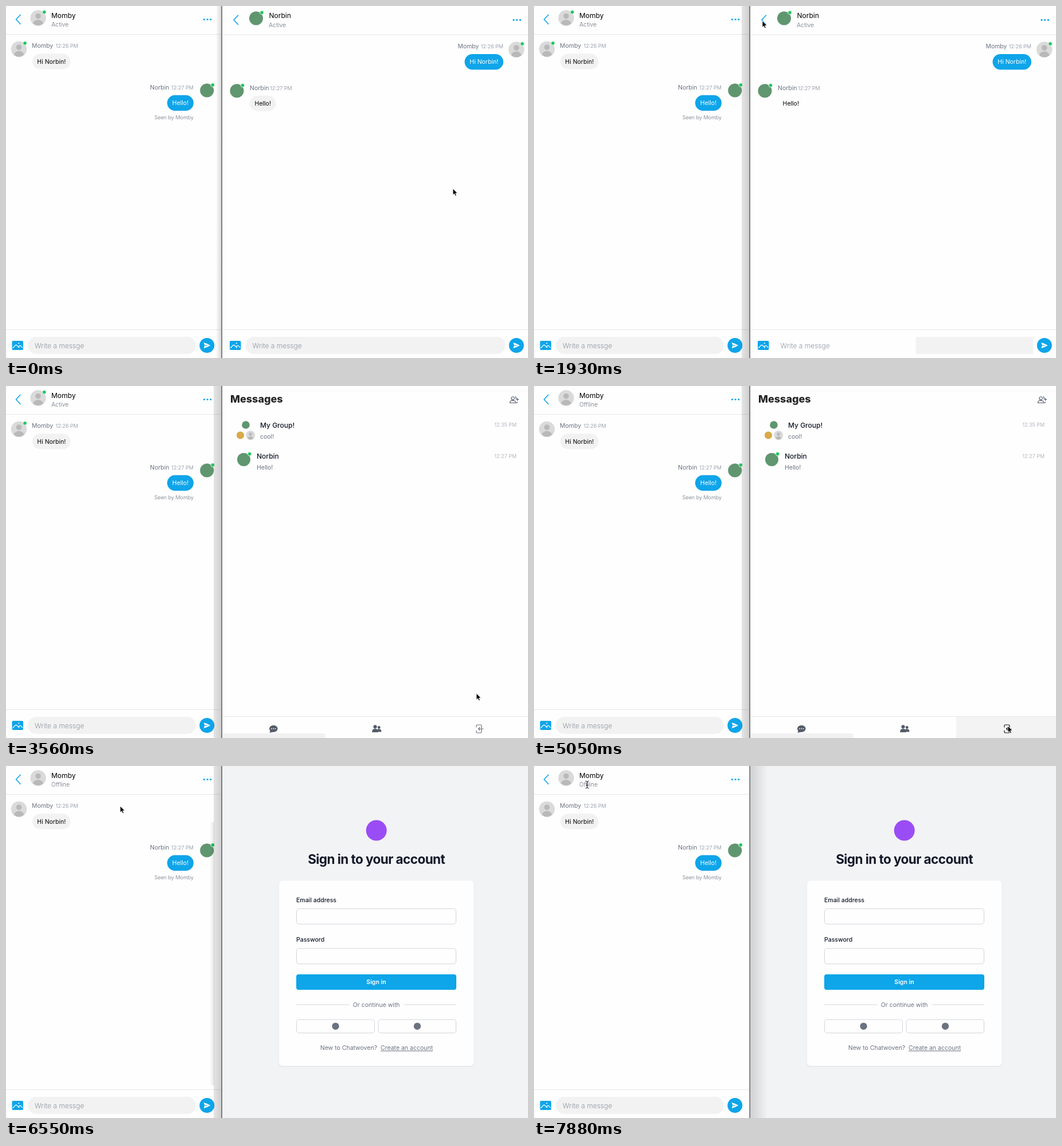
An HTML page for the animation above (8 s loop, 910 by 615 pixels).

```html
<!DOCTYPE html>
<html lang="en">
<head>
<meta charset="utf-8">
<title>Two chat windows</title>
<style>
  html, body { margin: 0; width: 100%; height: 100%; overflow: hidden; background: #fefefe; }
  svg { display: block; width: 100%; height: 100%; font-family: Inter, "Open Sans", sans-serif; }
</style>
</head>
<body>
<svg id="stage" viewBox="0 0 910 615"></svg>
<script>
const BLUE = '#0ea5e9', LINE = '#e4e6ea', PALE = '#f3f3f4', GRAY = '#6b7280', SOFT = '#9ca3af', INK = '#111827';
const GUEST = 'Momby', HOST = 'Norbin';

// Drawing helpers
const text = (x, y, str, size, fill = INK, weight = 400, anchor = 'start', extra = '') =>
  `<text x="${x}" y="${y}" font-size="${size}" fill="${fill}" font-weight="${weight}" text-anchor="${anchor}" ${extra}>${str}</text>`;
const rect = (x, y, w, h, fill, r = 0, extra = '') =>
  `<rect x="${x}" y="${y}" width="${w}" height="${h}" rx="${r}" fill="${fill}" ${extra}/>`;
const circle = (x, y, r, fill, extra = '') => `<circle cx="${x}" cy="${y}" r="${r}" fill="${fill}" ${extra}/>`;
const path = (d, stroke, width = 1, fill = 'none') =>
  `<path d="${d}" fill="${fill}" stroke="${stroke}" stroke-width="${width}" stroke-linecap="round" stroke-linejoin="round"/>`;
const rule = (x, y, w) => rect(x, y, w, 1, LINE);
const group = (id, body, extra = '') => `<g id="${id}" ${extra}>${body}</g>`;
const at = (x, y, body, scale = 1) => `<g transform="translate(${x} ${y}) scale(${scale})">${body}</g>`;

// Avatars
const silhouette = (x, y, r = 13.7) => at(x, y, circle(0, 0, 10, '#dadada') +
  circle(0, -2.4, 3.5, '#b9b9b9') + `<path d="M-6.3 7.2C-6 .8 6 .8 6.3 7.2Q0 12.2-6.3 7.2" fill="#b9b9b9"/>`, r / 10);
const mascot = (x, y, r = 12) => circle(x, y, r, '#5f9670');
const online = (x, y) => circle(x, y, 3.3, '#22c55e', 'stroke="#fff" stroke-width=".8"');

// Chat window parts; (x, y) is the pane's shift
const chatHeader = (x, y, width, name) =>
  path(`M${x + 25} ${15.5 + y}l-7.5 8 7.5 8`, BLUE, 1.6) +
  text(x + 79, 20.5 + y, name, 12, '#000') +
  [0, 5.7, 11.4].map(d => circle(x + width - 30.5 + d, 23.5 + y, 1.6, BLUE)).join('') +
  rule(x, 49 + y, width);

const messageBar = (x, width, id) =>
  rule(x, 565, width) +
  at(x + 10.5, 585, rect(0, 0, 19.5, 16, BLUE, 2) +
    path('M1.5 12.2L6 7.6Q7 6.8 8 7.6l4.4 4.4M11 10.6l2.3-2Q14.2 8 15 8.6l3 3', '#fff', 1.3) + circle(11.8, 4.3, 1.1, '#fff')) +
  group(id, rect(x + 38, 578, width - 82, 30, '#f2f2f2', 15)) +
  text(x + 50, 597.5, 'Write a messge', 12, '#8d94a0', 300) +
  circle(x + width - 24.7, 593, 13, BLUE) +
  at(x + width - 30.3, 588, '<path d="M0 0Q6 1.6 11.5 5 6 8.500 0 10L1.500 5.600H6.500V4.400H1.500Z" fill="#fff"/>');

const bubble = (x, y, w, str, mine, id) =>
  group(id, rect(x, y, w, 27.2, mine ? BLUE : '#f2f2f3', 13.6)) +
  text(x + w / 2, y + 17.4, str, 10.5, mine ? '#fff' : '#000', 400, 'middle');
const received = (x, timeX, y, name, time) =>
  text(x, y, name, 10.5, GRAY) + text(timeX, y, time, 9, SOFT);
const sent = (right, y, name, time) =>
  text(right - 42.5, y, name, 10.5, GRAY, 400, 'end') + text(right, y, time, 9, SOFT, 400, 'end');

const leftPane =
  chatHeader(0, 0, 376, GUEST) + silhouette(56, 21) + silhouette(22.5, 75.5) +
  group('guestActive', text(79, 36.3, 'Active', 10.5, GRAY, 300) + online(66.7, 10.7) + online(33, 65)) +
  group('guestOffline', text(79, 36.3, 'Offline', 10.5, GRAY, 300)) +
  received(45, 86.500, 73, GUEST, '12:26 PM') + bubble(46, 83.3, 66.5, `Hi ${HOST}!`) +
  sent(327, 146, HOST, '12:27 PM') + bubble(281, 155.8, 46, 'Hello!', true) +
  mascot(350.3, 147.5) + online(360.3, 138) +
  text(327, 198.3, `Seen by ${GUEST}`, 9, GRAY, 300, 'end') +
  messageBar(0, 375, 'leftField');

const rightChat =
  chatHeader(379.5, .8, 536, HOST) + text(458, 37, 'Active', 10.5, GRAY, 300) +
  mascot(436, 21.5) + online(446, 11.5) +
  sent(867, 74, GUEST, '12:26 PM') + bubble(799.5, 84, 67.5, `Hi ${HOST}!`, true) +
  silhouette(889.7, 76.3) + online(900, 66) +
  received(425, 460, 146.8, HOST, '12:27 PM') + bubble(425, 156.5, 45.5, 'Hello!', false, 'helloBubble') +
  mascot(402.5, 148.3) + online(412.5, 138.7) +
  messageBar(379.5, 535, 'rightField') + group('fieldRest', rect(665.5, 578, 205, 30, '#f2f2f2', 3));

// Conversation list
const person = (x, y) => circle(x, y - 3.7, 3.1, '#555c69') + `<path d="M${x - 5.4} ${y + 6}q0-6.300 5.400-6.300t5.400 6.300z" fill="#555c69"/>`;
const listPane =
  rect(377, 8.500, 533, 1, '#f7f7f8') +
  text(391, 28.500, 'Messages', 18, '#262626', 800) +
  group('addRing', circle(885.5, 24, 13.3, '#eeeff1')) +
  path('M883.500 18.800a2.700 2.700 0 1 0 .01 0M878.500 29.500v-1q.3-3.200 5-3.200t5 3.200v1zM887.500 18.700q2.500.7 1.700 3.800M889.800 29.500h1.200v-1.500M889.700 23.500h4M891.700 21.500v4', '#4b5563', 1.1) +
  mascot(418, 68, 6.8) + circle(408.5, 86, 6.6, '#d9a94a') + silhouette(426.2, 86, 8) +
  text(443, 72.500, 'My Group!', 12, INK, 500) + text(443, 91.500, 'cool!', 10.5, GRAY) +
  text(890, 71.3, '12:35 PM', 9, SOFT, 300, 'end') +
  mascot(414.5, 128.5, 11.5) + online(424.7, 118.7) +
  text(437, 127, HOST, 12, INK, 500) + text(437, 146, 'Hello!', 10.5, GRAY) +
  text(890, 125.5, '12:27 PM', 9, SOFT, 300, 'end') +
  group('tabFill', rect(377, 578, 179, 29, '#ebecee')) + rect(377, 607, 179, 8, '#f1f1f2') +
  group('exitHover', rect(735.8, 578, 175, 37, PALE)) +
  rule(377, 577, 533) +
  `<ellipse cx="466.300" cy="598.700" rx="7.300" ry="6" fill="#555c69"/><path d="M461 601l-1.500 5 6-1.500z" fill="#555c69"/>` +
  [463, 466.3, 469.6].map(x => circle(x, 598.7, .9, '#fff')).join('') +
  at(650.2, 599.500, person(0, 0), .8) + person(643.5, 599) +
  group('exitIcon', path('M820 596v-2.300q0-1.700 1.700-1.700h5.600q1.700 0 1.700 1.700v10.600q0 1.700-1.700 1.700h-5.600q-1.700 0-1.700-1.700V602M832 599h-8.500M826 596.500l-2.500 2.500 2.500 2.500', 'currentColor', 1.2)) +
  group('loading', rect(377, 8, 533, 607, '#f3f5f8', 0, 'opacity=".53"') +
    group('spinner', `<path d="M13.400 0A13.400 13.400 0 1 1 0-13.400" transform="rotate(0)" fill="none" stroke="#1d8fd0" stroke-width="1.800"/>`));

// Sign-in page
const outlined = (x, y, w, h) => rect(x, y, w, h, '#fefefe', 4.5, 'stroke="#d1d5db"');
const signIn =
  rect(377, 0, 533, 615, '#f2f3f5') +
  circle(645.7, 112.5, 18, '#9a4df5') +
  text(645.7, 171, 'Sign in to your account', 22.5, INK, 700, 'middle', 'letter-spacing="-.56"') +
  rect(475.5, 201, 340.5, 324.5, '#e3e5e8', 6) + rect(476, 200.5, 339.5, 323.5, '#fefefe', 6) +
  text(506, 237.5, 'Email address', 10.5, INK, 500) + outlined(506.5, 249.3, 278, 27) +
  text(506, 307.3, 'Password', 10.5, INK, 500) + outlined(506.5, 318.8, 278, 27) +
  rect(506, 364, 279, 27, BLUE, 4) +
  text(645.5, 381.3, 'Sign in', 10.5, '#fff', 600, 'middle') +
  rect(506, 416.5, 92.500, 1, '#d4d7dc') + rect(693.5, 416.5, 91.5, 1, '#d4d7dc') +
  text(645.7, 420.7, 'Or continue with', 10.5, GRAY, 400, 'middle') +
  outlined(506.5, 443, 136, 23.5) + outlined(649, 443, 135.5, 23.5) +
  circle(574.5, 454.7, 6.2, GRAY) + circle(717, 454.7, 6.2, GRAY) +
  text(647, 496.3, 'New to Chatwoven?', 10.5, GRAY, 400, 'end') +
  text(653, 496.3, 'Create an account', 10.5, GRAY, 400, 'start', 'text-decoration="underline"');

// Window edge shadows
const fade = (id, from, to) => `<linearGradient id="${id}"><stop stop-color="#000" stop-opacity="${from}"/>` +
  `<stop offset="1" stop-color="#000" stop-opacity="${to}"/></linearGradient>`;
const edges =
  group('softEdge', rect(366, 0, 10, 615, 'url(#rise)')) +
  group('hardEdge', rect(362, 0, 14, 615, 'url(#band)')) +
  group('wideEdge', rect(355, 98, 8, 460, 'url(#faint)')) +
  group('rightEdge', rect(377, 0, 30, 615, 'url(#fall)'));

document.getElementById('stage').innerHTML =
  `<defs>${fade('rise', 0, .16)}${fade('band', .1, .19)}${fade('faint', 0, .09)}${fade('fall', .14, 0)}</defs>` +
  rect(0, 0, 910, 615, '#fefefe') + leftPane +
  group('chat', rightChat) + group('list', listPane) + group('login', signIn) + edges +
  rect(375.6, 0, 1.2, 615, '#3d3d3d') +
  group('cursor',
    group('arrow', '<path d="M0 0V11.300L2.600 8.900 4.400 12.800 6.400 11.900 4.700 8.100H8.200Z" fill="#000" stroke="#fff" stroke-width=".9"/>') +
    group('beam', path('M-2.500-6.300Q0-6.300 0-4.500V4.500Q0 6.300-2.500 6.300M2.500-6.300Q0-6.300 0-4.500M0 4.500Q0 6.300 2.500 6.300M-1.500.9h3', '#111')));

// Cursor stops: step, x, y
const stops = [[0, 779, 319], [1, 779, 314], [2, 778, 309], [3, 778, 309], [4, 657, 222], [5, 657, 222],
  [6, 637, 195], [9, 480, 80], [13, 398, 26], [21, 398, 26], [22, 480, 110], [24, 820, 537], [27, 826, 594],
  [40, 826, 594], [41, 760, 530], [44, 199, 70], [46, 122, 46], [48, 87, 33], [49, 85, 34], [50, 79, 34],
  [52, 79, 34], [53, 92.7, 32.6]];

function cursorAt(step) {
  const i = stops.findIndex(s => s[0] >= step);
  if (i < 0) return stops[stops.length - 1].slice(1);
  if (stops[i][0] === step) return stops[i].slice(1);
  const [a, b] = [stops[i - 1], stops[i]], p = (step - a[0]) / (b[0] - a[0]);
  return [1, 2].map(n => a[n] + (b[n] - a[n]) * p);
}

const LOOP = 8000, STEP = 148.4;
const el = id => document.getElementById(id);
const show = (id, on) => { el(id).style.display = on ? '' : 'none'; };

function draw(time) {
  const step = Math.floor((time % LOOP + 9) / STEP);
  const between = (from, to) => step >= from && step < to;

  show('chat', step < 18);
  show('list', between(18, 36));
  show('login', step >= 36);
  show('guestActive', step < 34);
  show('guestOffline', step >= 34);

  show('helloBubble', step < 6);
  show('rightField', step < 6);
  show('fieldRest', step >= 6);

  show('loading', step < 20);
  show('tabFill', step < 20);
  show('addRing', step < 20);
  el('spinner').setAttribute('transform', `translate(646 307) rotate(${100 + (step - 18) * 71})`);
  show('exitHover', step >= 26);
  el('exitIcon').style.color = step >= 27 ? '#111' : '#6b7280';

  show('softEdge', step < 6);
  show('hardEdge', between(6, 46));
  show('wideEdge', between(42, 46));
  show('rightEdge', step >= 46);

  const [x, y] = cursorAt(step);
  el('cursor').setAttribute('transform', `translate(${x} ${y})`);
  show('arrow', step < 48);
  show('beam', step >= 48);
}

const start = performance.now();
(function tick() {
  draw(performance.now() - start);
  requestAnimationFrame(tick);
})();
</script>
</body>
</html>
```
